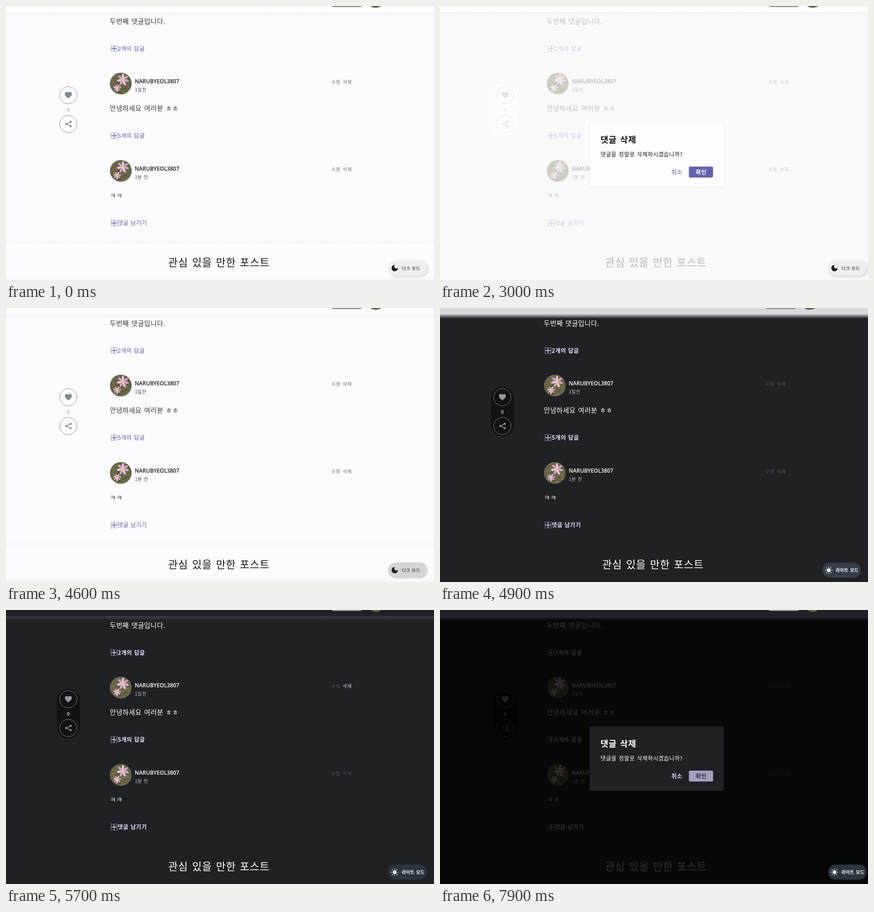
Animation, 935 px wide and 599 px high, one loop 8000 ms. Source, as an HTML page:

```html
<!DOCTYPE html>
<html lang="ko">
<head>
<meta charset="utf-8">
<title>댓글 삭제</title>
<style>
html, body { margin: 0; width: 100%; height: 100%; overflow: hidden; }
svg { display: block; }
#stage {
  --bg: #fcfcff; --ink: #38383c; --strong: #18181b; --sub: #4a4a4f; --num: #8a8a90;
  --act: #6c6c71; --hot: #5450a0; --link: #5c58a6; --line: #868e96; --icon: #7f898f;
  --pill: #fcfcff; --head: #fdfcff; --edge: #3a3a40; --glow: rgba(0,0,0,.045);
  --foot: rgba(0,0,0,.03); --veil: rgba(249,249,249,.7);
  --tog: #efeef2; --togInk: #1b1b1f; --modal: #fdfcff;
  --ok: #6563ad; --okInk: #fff; --cancel: #6b69b1;
  background: var(--bg);
}
#stage.tog { --tog: #d5d4d8; }
#stage.cancel { --cancel: #8d8bc4; }
#stage.dark {
  --bg: #202125; --ink: #fff; --strong: #fff; --sub: #c6c6ca; --num: #c6c6ca;
  --act: #56575c; --hot: #dfdafa; --link: #e4dffd; --line: #84868a; --icon: #93999d;
  --pill: #111214; --head: #202125; --edge: #d8d8dc; --glow: rgba(150,165,180,.24);
  --foot: transparent; --veil: rgba(0,0,0,.8);
  --tog: #2c343c; --togInk: #fff; --modal: #202125;
  --ok: #dcd5fd; --okInk: #302f3c; --cancel: #e0dafd;
}
#stage.turn { --head: #dbd9de; --edge: #55555a; --glow: rgba(235,235,240,.85); --tog: #353d46; }
#stage.ok { --ok: #a59fbe; }
text {
  font-family: "Noto Sans CJK KR", "Noto Sans CJK", sans-serif;
  letter-spacing: .032em; word-spacing: .07em; white-space: pre;
}
.name { font-family: "Open Sans", sans-serif; font-weight: 600; letter-spacing: 0; }
.b { font-weight: 700; }
.thin { font-weight: 350; }
.ink { fill: var(--ink); } .strong { fill: var(--strong); }
.sub { fill: var(--sub); } .act { fill: var(--act); }
.link { fill: var(--link); font-weight: 500; } .icon { fill: var(--icon); }
.dark .link { font-weight: 700; }
.del .target { fill: var(--hot); }
.ring { fill: var(--pill); stroke: var(--line); }
.light, .night, .overlay, .halo { display: none; }
#stage:not(.dark) .light, .dark .night, .open .overlay { display: inline; }
.open:not(.dark) .halo { display: inline; }
.open .shift { transform: translateX(6.5px); }
.open .shift2 { transform: translateX(12.5px); }
.count { fill: var(--num); text-anchor: middle; }
.dark .count { font-weight: 700; }
.toggle { fill: var(--tog); filter: drop-shadow(2px 2px 2.5px rgba(0,0,0,.18)); }
.tog .toggle { filter: drop-shadow(1px 1px 2px rgba(0,0,0,.2)); }
.dark .toggle { filter: none; }
.modal { fill: var(--modal); filter: drop-shadow(0 1px 2px rgba(0,0,0,.07)); }
</style>
</head>
<body>
<svg id="stage" width="935" height="599" viewBox="0 0 935 599">
  <defs>
    <linearGradient id="under" x2="0" y2="1">
      <stop style="stop-color:var(--glow)"/><stop offset="1" style="stop-color:var(--glow);stop-opacity:0"/>
    </linearGradient>
    <linearGradient id="above" x2="0" y1="1" y2="0">
      <stop style="stop-color:var(--foot)"/><stop offset="1" style="stop-color:var(--foot);stop-opacity:0"/>
    </linearGradient>
    <clipPath id="round"><circle r="23.75"/></clipPath>
    <g id="photo" clip-path="url(#round)"></g>
    <path id="grid"/>
  </defs>
  <rect y="509" width="935" height="10.5" fill="url(#above)"/>
  <rect y="593" width="935" height="6" fill="url(#above)"/>
  <g class="shift" id="page">
    <rect x="111" y="172" width="50.5" height="109" rx="25" style="fill:var(--pill)"/>
    <circle class="ring" cx="136.2" cy="195" r="18.8"/>
    <circle class="ring" cx="136.2" cy="258" r="18.8"/>
    <path class="icon" transform="translate(127 185.6) scale(.77)" d="M12 21.35l-1.45-1.32C5.4 15.36 2 12.28 2 8.5 2 5.42 4.42 3 7.5 3c1.74 0 3.41.81 4.5 2.09C13.09 3.81 14.76 3 16.5 3 19.58 3 22 5.42 22 8.5c0 3.78-3.4 6.86-8.55 11.54z"/>
    <g class="icon" transform="translate(136.4 258)">
      <path d="M4.6-4.7L-4.6 0 4.6 4.7" fill="none" style="stroke:var(--icon)" stroke-width="1.5"/>
      <circle cx="4.7" cy="-4.8" r="2.3"/><circle cx="-4.7" r="2.3"/><circle cx="4.7" cy="4.8" r="2.3"/>
    </g>
  </g>
  <g class="overlay">
    <rect width="935" height="599" style="fill:var(--veil)"/>
    <rect class="halo" x="110" y="171" width="58" height="111" rx="26" fill="#fff" opacity=".3"/>
    <rect class="modal" x="327" y="254.5" width="293" height="140.5" rx="3"/>
    <rect x="543.7" y="351" width="52.8" height="24" rx="3" style="fill:var(--ok)"/>
    <g id="dialog"></g>
  </g>
  <rect y="13" width="935" height="10" fill="url(#under)"/>
  <rect width="935" height="13.5" style="fill:var(--head)"/>
  <g class="shift">
    <rect x="709.5" y="-28" width="70" height="29.3" rx="7" fill="none" style="stroke:var(--edge)" stroke-width="1.2"/>
    <use href="#photo" transform="translate(807.7 -15.5) scale(.82)"/>
  </g>
  <g class="shift2" id="mode">
    <rect class="toggle" x="835.3" y="556.5" width="84.4" height="33" rx="16.5"/>
    <path class="light" transform="translate(840 564) scale(.76)" fill="#1b1b1f" d="M12 3a9 9 0 1 0 9 9c0-.46-.04-.92-.1-1.36a5.39 5.39 0 0 1-4.4 2.26 5.4 5.4 0 0 1-3.14-9.8c-.44-.06-.9-.1-1.36-.1z"/>
    <g class="night" id="sun" transform="translate(849.2 573.2)" fill="#fff"><circle r="4"/></g>
  </g>
</svg>
<script>
const NS = "http://www.w3.org/2000/svg";
const $ = id => document.getElementById(id);

function add(parent, tag, attrs, content) {
  const el = document.createElementNS(NS, tag);
  for (const k in attrs) el.setAttribute(k, attrs[k]);
  if (content) el.textContent = content;
  return parent.appendChild(el);
}

// y is the middle of the glyphs
const label = (parent, x, y, size, cls, str, style = "") =>
  add(parent, "text", { x, y: y + size * .38, "font-size": size, class: cls, style }, str);

function drawPhoto() {
  const g = $("photo");
  let seed = 7;
  const rnd = () => (seed = seed * 16807 % 2147483647) / 2147483647;
  add(g, "rect", { x: -24, y: -24, width: 48, height: 48, fill: "#6a6549" });
  const tones = ["#4d5632", "#857b5e", "#5c6c3a", "#40402c", "#8f8a6c"];
  for (let i = 0; i < 90; i++) {
    const x = rnd() * 48 - 24, y = rnd() * 48 - 24;
    add(g, "ellipse", { rx: 1.5 + rnd() * 3, ry: .6 + rnd() * .8, fill: tones[i % 5], opacity: .75,
      transform: `translate(${x} ${y}) rotate(${rnd() * 180})` });
  }
  const flower = (x, y, r, n, turn) => {
    for (let i = 0; i < n; i++)
      add(g, "ellipse", { cx: r * .58, rx: r * .44, ry: r * .19, fill: i % 2 ? "#e9c8e3" : "#d5a6cf",
        transform: `translate(${x} ${y}) rotate(${turn + i * 360 / n})` });
    add(g, "circle", { cx: x, cy: y, r: r * .22, fill: "#e8d35a" });
  };
  flower(4.5, -8.5, 13, 7, 15);
  flower(-8, 10, 8.5, 7, 40);
}

function drawGrid() {
  let d = "M-.7-7.1h1.4v14.2h-1.4zM-7.1-.7h14.2v1.4h-14.2z";
  for (const a of [-7.1, -3.9, 2.5, 5.7])
    for (const b of [-7.1, 5.7])
      d += `M${a} ${b}h1.4v1.4h-1.4zM${b} ${a}h1.4v1.4h-1.4z`;
  $("grid").setAttribute("d", d);
}

function drawPage() {
  const page = $("page");
  label(page, 136.4, 227, 10, "count", "0");
  const rows = [
    { y: 33, body: "두번째 댓글입니다.", reply: "2개의 답글" },
    { y: 223.5, body: "안녕하세요 여러분 ㅎㅎ", reply: "5개의 답글", age: "1일전" },
    { y: 414.5, body: "ㅋㅋ", reply: "댓글 남기기", age: "1분 전" }
  ];
  rows.forEach(({ y, body, reply, age }, i) => {
    label(page, 226.8, y, 14.6, "ink", body);
    add(page, "use", { href: "#grid", x: 236.2, y: y + 60, class: "link" });
    label(page, 244, y + 60, 12.4, "link", reply);
    if (!age) return;
    add(page, "use", { href: "#photo", transform: `translate(250.8 ${y - 54})` });
    label(page, 281.3, y - 58.6, 11.8, "strong name", "NARUBYEOL3807");
    label(page, 281.5, y - 40.5, 10, "sub", age);
    label(page, 710.7, y - 57.2, 10.3, "act", "수정");
    label(page, 735.6, y - 57.2, 10.3, i === 1 ? "act target" : "act", "삭제");
  });
  label(page, 354.2, 560.5, 22.85, "strong thin", "관심 있을 만한 포스트");
}

function drawControls() {
  const box = $("dialog"), mode = $("mode");
  label(box, 350.5, 291.5, 18.7, "strong b", "댓글 삭제");
  label(box, 350.7, 324, 12.3, "strong", "댓글을 정말로 삭제하시겠습니까?");
  label(box, 505.6, 363.7, 12.4, "b", "취소", "fill:var(--cancel)");
  label(box, 558.6, 363.7, 12.4, "b", "확인", "fill:var(--okInk)");
  label(mode, 864.6, 573, 9.6, "light", "다크 모드", "fill:var(--togInk)");
  label(mode, 864.6, 573, 9.7, "night b", "라이트 모드", "fill:var(--togInk)");
  for (let a = 0; a < 360; a += 45)
    add($("sun"), "rect", { x: 5.7, y: -.8, width: 2.4, height: 1.6, rx: .6, transform: `rotate(${a})` });
}

drawPhoto();
drawGrid();
drawPage();
drawControls();

const LOOP = 8000;
const steps = [
  [0, ""], [500, "del"], [1200, "open"], [3000, "open cancel"], [3400, ""], [4600, "tog"],
  [4900, "dark turn"], [5000, "dark"], [5700, "dark del"], [6200, "dark open"], [7900, "dark open ok"]
];
const start = performance.now();
let shown = null;

function tick() {
  const t = (performance.now() - start) % LOOP;
  const state = steps.filter(s => s[0] <= t).pop()[1];
  if (state !== shown) $("stage").setAttribute("class", shown = state);
  requestAnimationFrame(tick);
}
tick();
</script>
</body>
</html>
```
